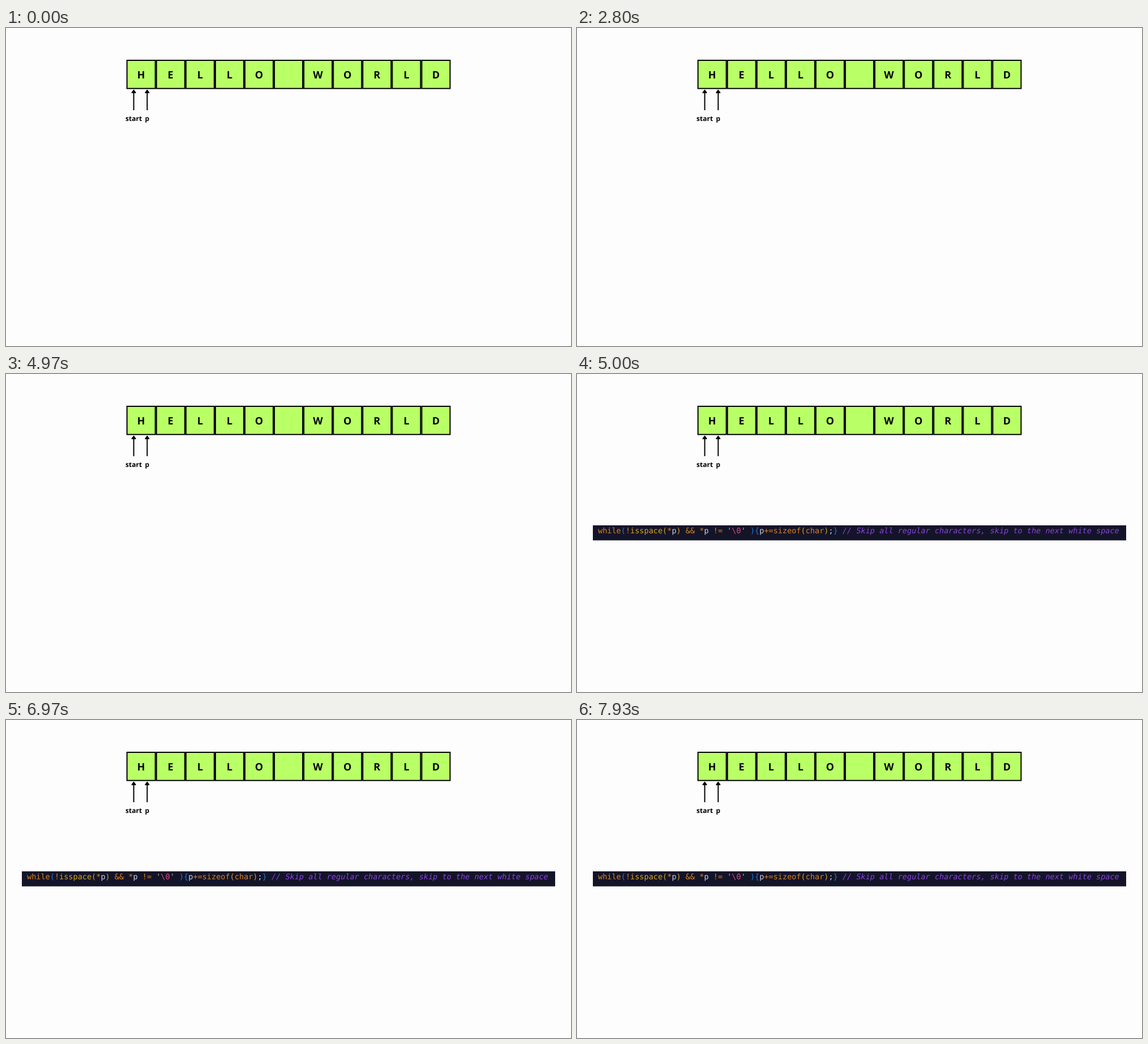
An HTML page for the animation above (8000 ms loop, 998x561 px).

```html
<!DOCTYPE html>
<html lang="en">
<head>
<meta charset="utf-8">
<title>String pointers</title>
<style>
  html, body { margin: 0; width: 100%; height: 100%; overflow: hidden; background: #fdfdfd; }
  svg { display: block; width: 100%; height: 100%; }
  text { text-rendering: geometricPrecision; }
  .cell { fill: #b9ff66; stroke: #000; stroke-width: 2; }
  .letter { font: bold 18px "Noto Sans", "Open Sans", sans-serif; text-anchor: middle; }
  .label { font: bold 12px "Noto Sans", "Open Sans", sans-serif; text-anchor: middle; }
  .code { font: 13.54px "DejaVu Sans Mono", monospace; white-space: pre; }
</style>
</head>
<body>
<svg id="stage" viewBox="0 0 998 561"></svg>
<script>
const LOOP = 8000, CODE_AT = 5000;
const stage = document.getElementById("stage");

function add(parent, tag, attrs, text) {
  const el = document.createElementNS("http://www.w3.org/2000/svg", tag);
  for (const key in attrs) el.setAttribute(key, attrs[key]);
  if (text !== undefined) el.textContent = text;
  parent.appendChild(el);
  return el;
}

function drawCell(char, i) {
  const x = 213.7 + i * 52.07;
  add(stage, "rect", { class: "cell", x, y: 57, width: 50, height: 49.7 });
  add(stage, "text", { class: "letter", x: x + 24.9, y: 88.8 }, char);
}

function drawPointer(x, name) {
  add(stage, "path", { d: `M${x} 145V112`, stroke: "#000", "stroke-width": 2 });
  add(stage, "path", {
    d: `M${x} 109.5l3.4 4.7h-6.8z`, stroke: "#000", "stroke-width": 1.4, "stroke-linejoin": "round"
  });
  add(stage, "text", { class: "label", x, y: 164 }, name);
}

function drawCode() {
  const orange = "#d9821b", yellow = "#d3a51c", blue = "#1b78d2",
        light = "#c6cde6", green = "#8fc08a", pink = "#e0457f", purple = "#8743dc";
  const tokens = [
    ["while", orange], ["(", blue], ["!", orange], ["isspace(", yellow],
    ["*", orange], ["p", light], [")", yellow], [" && *", orange], ["p", light],
    [" != ", orange], ["'", green], ["\\0", pink], ["'", green], [" ){", blue],
    ["p", light], ["+=sizeof", orange], ["(", yellow], ["char", orange],
    [")", yellow], [";", light], ["}", blue]
  ];
  const group = add(stage, "g", {});
  add(group, "rect", { x: 28, y: 267, width: 942, height: 26.5, fill: "#141429" });
  const line = add(group, "text", { class: "code", x: 37, y: 281.3, "xml:space": "preserve" });
  for (const [text, fill] of tokens) add(line, "tspan", { fill }, text);
  add(line, "tspan", { fill: purple, "font-style": "italic" },
    " // Skip all regular characters, skip to the next white space");
  return group;
}

[..."HELLO WORLD"].forEach(drawCell);
drawPointer(225.6, "start");
drawPointer(249.4, "p");
const code = drawCode();

function render(time) {
  code.setAttribute("visibility", time >= CODE_AT ? "visible" : "hidden");
}

const start = performance.now();
function tick() {
  render((performance.now() - start) % LOOP);
  requestAnimationFrame(tick);
}
tick();
</script>
</body>
</html>
```
